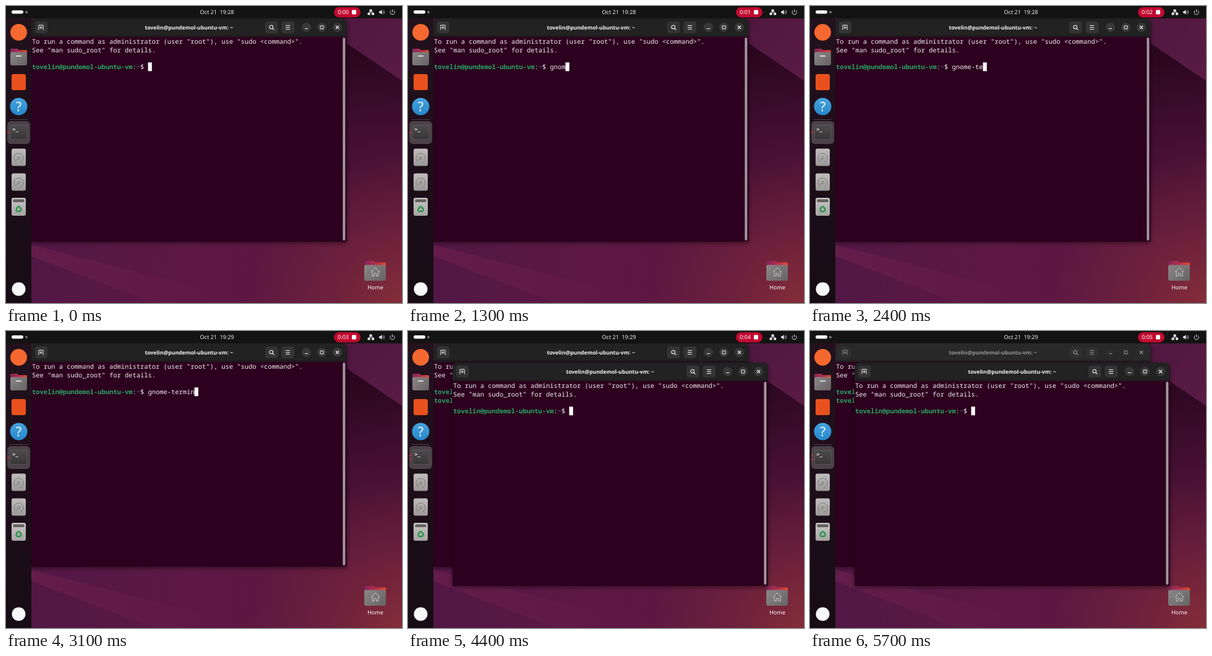
These frames come from a looping animation (640x480 px, 5800 ms). An HTML page with a canvas:

```html
<!DOCTYPE html>
<html lang="en">
<head>
<meta charset="utf-8">
<title>Opening a terminal</title>
<style>
html, body { margin: 0; width: 100%; height: 100%; overflow: hidden; background: #131313; }
canvas { display: block; width: 640px; height: 480px; }
</style>
</head>
<body>
<canvas id="stage" width="640" height="480"></canvas>
<script>
const ctx = document.getElementById('stage').getContext('2d');
ctx.textRendering = 'geometricPrecision';

const LOOP = 5800, STEP = 100;
const USER = 'tovelin@pundemol-ubuntu-vm';
const COMMAND = 'gnome-terminal';
// Moment at which each letter of the command appears.
const KEYS = [700, 900, 1100, 1300, 1500, 1800, 2000, 2400, 2800, 2900, 3100, 3100, 3300, 3400];
const ENTER = 4200, LAUNCH = 4300, OPEN = 4400;
const CELL = 6.25, ROW = 13.75;
const SANS = '"Noto Sans", sans-serif';
const MONO = '"Noto Sans Mono", monospace';

function rect(x, y, w, h, fill, r = 0) {
  ctx.beginPath();
  ctx.roundRect(x, y, w, h, r);
  ctx.fillStyle = fill;
  ctx.fill();
}

function disc(x, y, r, fill) {
  ctx.beginPath();
  ctx.arc(x, y, r, 0, 2 * Math.PI);
  ctx.fillStyle = fill;
  ctx.fill();
}

function poly(fill, ...points) {
  ctx.beginPath();
  points.forEach(([x, y]) => ctx.lineTo(x, y));
  ctx.fillStyle = fill;
  ctx.fill();
}

// Strokes an SVG-style path around a centre point.
function icon(x, y, path, color, width = 1) {
  ctx.save();
  ctx.translate(x, y);
  ctx.strokeStyle = color;
  ctx.lineWidth = width;
  ctx.stroke(new Path2D(path));
  ctx.restore();
}

function text(str, x, y, font, color, align = 'center') {
  ctx.font = font;
  ctx.textAlign = align;
  ctx.fillStyle = color;
  ctx.fillText(str, x, y);
}

function stops(g, colors) {
  colors.forEach((c, i) => g.addColorStop(i / (colors.length - 1), c));
  return g;
}

function gradient(x0, y0, x1, y1, ...colors) {
  return stops(ctx.createLinearGradient(x0, y0, x1, y1), colors);
}

function glow(x, y, r, ...colors) {
  return stops(ctx.createRadialGradient(x, y, 0, x, y, r), colors);
}

function mix(a, b, k) {
  const v = Math.round(a + (b - a) * k);
  return `rgb(${v},${v},${v})`;
}

function wallpaper() {
  rect(0, 0, 640, 480, gradient(540, 20, 640, 110, '#4f173f', '#5a1b45'));
  poly(gradient(548, 85, 590, 390, '#2c0720', '#471034', '#5c173f'),
    [540, 53], [640, 121], [640, 480], [540, 480]);
  rect(0, 370, 551, 110, gradient(40, 380, 551, 400, '#521745', '#5d1944', '#5c173f'));
  poly(gradient(41, 395, 330, 450, '#641d4b', '#5d1944'),
    [41, 386], [330, 460], [330, 480], [238, 480], [41, 404]);
  rect(0, 0, 640, 480, glow(660, 500, 270, 'rgba(142,51,54,0.9)', 'rgba(142,51,54,0.35)', 'rgba(142,51,54,0)'));
}

function folder(x, y, w, h) {
  const top = gradient(x, y, x + w, y, '#7c2858', '#b52c4c', '#e34b2a');
  rect(x, y, w * 0.48, h * 0.4, top, 2);
  rect(x, y + h * 0.08, w, h * 0.5, top, 2);
  rect(x, y + h * 0.2, w, h * 0.8, gradient(x, y, x + w, y + h, '#8e8b8c', '#666263'), 3);
}

function topBar(t) {
  rect(0, 0, 640, 20, '#131313');
  rect(9, 7, 19, 5.5, '#f4f4f4', 2.75);
  disc(33, 10, 2, '#777');
  text('Oct 21  19:' + (t < 2800 ? 28 : 29), 341, 13, '9px ' + SANS, '#f0f0f0');

  rect(530, 2, 43, 16.5, '#c0092f', 8.2);
  const seconds = Math.floor((t + 200) / 1000);
  text('0:0' + seconds, 545, 13.2, '9px ' + SANS, '#fff');
  rect(559, 6.5, 7, 7, '#fff', 1);

  rect(587.5, 5.5, 4, 3.5, '#eee');
  rect(584.5, 11, 4, 3.5, '#eee');
  rect(591, 11, 4, 3.5, '#eee');
  icon(589.5, 10, 'M0-1V0.5M-3 1V0H3.5V1', '#eee', 0.8);
  poly('#eee', [603, 8.5], [605, 8.5], [607.5, 6], [607.5, 14], [605, 11.5], [603, 11.5]);
  icon(607, 10, 'M2-2Q3.5 0 2 2M3.5-3.5Q6 0 3.5 3.5', '#aaa', 0.9);
  icon(624.5, 10, 'M-2.2-2.7A3.6 3.6 0 1 0 2.2-2.7M0-4.5V0', '#ddd', 1);
}

function disk(y) {
  rect(9, y - 14, 23, 28, gradient(0, y - 14, 0, y + 14, '#bfbdbc', '#9b9998'), 3);
  icon(20.5, y + 1, 'M-5 5.5A7.5 7.5 0 1 1 2 7.2M-5 5.5L-1.6 1.6', '#7c7978', 1);
  disc(20.5, y + 1, 2.5, '#7c7978');
  disc(20.5, y + 1, 1.5, '#b0aead');
}

function trash() {
  rect(9, 310, 23, 29, gradient(0, 310, 0, 339, '#c8c6c5', '#a6a4a3'), 3);
  rect(11.5, 312.5, 18, 4.5, '#62605f', 1);
  for (let i = 0; i < 3; i++) {
    ctx.save();
    ctx.translate(20.5, 328.5);
    ctx.rotate(i * 2 * Math.PI / 3);
    icon(0, 0, 'M-3-1.6L-1.3-4.3H1.1L2.4-2.3', '#16913b', 1.8);
    poly('#16913b', [0.8, -1.6], [4.2, -3.6], [4, 0]);
    ctx.restore();
  }
}

function dock(t) {
  rect(0, 20, 41, 460, gradient(0, 20, 0, 480, '#22121d', '#1d0d19', '#170c14'));
  disc(20.5, 42.5, 13.5, '#f5682f');
  folder(7, 69, 27, 27);
  rect(16, 80, 9, 1.6, '#eee');
  rect(9, 110, 23, 26, '#e8511d', 3);
  disc(20.5, 162.5, 14, gradient(0, 148, 0, 177, '#46a3e0', '#2587c9'));
  text('?', 20.5, 170, '21px ' + SANS, '#fff');
  rect(6, 183, 29, 1, '#4b3f47');

  rect(2, 186, 37, 37, '#4b4147', 6);
  rect(7, 192, 27.5, 24, gradient(0, 192, 0, 216, '#4d4b4c', '#373536'), 3);
  icon(0, 0, 'M7.5 192.5H34V215.5H7.5Z', '#625f60', 0.7);
  text('>_', 10.5, 202, 'bold 8px "DejaVu Sans Mono", monospace', '#f2f2f2', 'left');
  const dots = t < LAUNCH ? [204.5] : [201.5, 207.5];
  dots.forEach(y => disc(3.5, y, 1.4, '#e02a2d'));

  disk(244.5);
  disk(284.5);
  trash();
  disc(20.5, 457.5, 11, '#f7f7f7');
}

function home() {
  folder(579, 412, 35, 32);
  icon(597, 430, 'M-7 0L0-7L7 0M-5-1.5V6.5H-1.7V2H1.7V6.5H5V-1.5', '#c9c6c6', 1);
  text('Home', 597, 458, '9px ' + SANS, '#fff');
}

// Text on the fixed character grid of a terminal.
function cells(str, col, row, color, weight = '') {
  [...str].forEach((ch, i) =>
    text(ch, 42 + (col + i) * CELL, 60.8 + row * ROW, `${weight} 10.4px ${MONO}`, color, 'left'));
}

function prompt(row, command = '') {
  const at = USER.length;
  cells(USER, 0, row, '#2aa565', 'bold');
  cells(':', at, row, '#f2eef1');
  cells('~', at + 1, row, '#4a6c9c', 'bold');
  cells('$ ' + command, at + 2, row, '#f2eef1');
}

function cursor(col, row) {
  rect(42 + col * CELL, 50 + row * ROW, CELL, 14, '#fff');
}

function header(blur) {
  const ink = mix(245, 150, blur);
  const button = mix(52, 47, blur);
  rect(41, 20, 509.5, 30, mix(34, 41, blur), [8, 8, 0, 0]);
  rect(47, 25, 20, 19, button, 4);
  rect(419, 25, 20.5, 19, button, 4);
  rect(445.5, 25, 20.5, 19, button, 4);
  [485.5, 510.5, 535.5].forEach(x => disc(x, 34.5, 7.5, mix(56, 43, blur)));

  icon(56.5, 34.5, 'M-4.5 3.5H-3.5V-3.5H3.5V3.5H4.5M0-2V2.5M-2 0.5H2', ink);
  icon(429.5, 34.5, 'M2-0.5A2.8 2.8 0 1 1-3.6-0.5A2.8 2.8 0 1 1 2-0.5M1.3 1.6L4 4.3', ink, 1.1);
  icon(455.5, 34.5, 'M-3.5-3H3.5M-3.5 0H3.5M-3.5 3H3.5', ink);
  icon(485.5, 34.5, 'M-2.5 2H2.5', ink);
  icon(510.5, 34.5, 'M-2.5-2.5H2.5V2.5H-2.5Z', ink);
  icon(535.5, 34.5, 'M-2.5-2.5L2.5 2.5M2.5-2.5L-2.5 2.5', ink, 1.1);
  text(USER + ': ~', 295.7, 37.7, 'bold 8.68px ' + SANS, ink);
}

function terminal(offset, blur, content) {
  ctx.save();
  ctx.translate(offset, offset);
  ctx.shadowColor = 'rgba(0,0,0,0.5)';
  ctx.shadowBlur = 7;
  ctx.shadowOffsetY = 2;
  rect(41, 20, 509.5, 361, '#2c001e', [8, 8, 0, 0]);
  ctx.shadowColor = 'transparent';
  header(blur);
  rect(41, 48, 509.5, 1, '#1a1518');
  rect(544.3, 51, 4, 328, '#a1969d', 2);
  cells('To run a command as administrator (user "root"), use "sudo <command>".', 0, 0, '#f2eef1');
  cells('See "man sudo_root" for details.', 0, 1, '#f2eef1');
  content();
  ctx.restore();
}

function firstShell(t) {
  const typed = KEYS.filter(k => t >= k).length;
  prompt(3, COMMAND.slice(0, typed));
  if (t >= OPEN) prompt(4);
  else if (t >= ENTER) cursor(0, 4);
  else if (t < 4000) cursor(USER.length + 4 + typed, 3);
}

function secondShell(t) {
  prompt(3);
  if (t < 5000 || t >= 5600) cursor(USER.length + 4, 3);
}

function draw(t) {
  wallpaper();
  home();
  const blur = Math.min(1, Math.max(0, (t - OPEN) / 300));
  terminal(0, blur, () => firstShell(t));
  if (t >= OPEN) terminal(31, 0, () => secondShell(t));
  dock(t);
  topBar(t);
}

const start = performance.now();
function frame() {
  const t = (performance.now() - start) % LOOP;
  draw(Math.floor(t / STEP) * STEP);
  requestAnimationFrame(frame);
}
frame();
</script>
</body>
</html>
```
